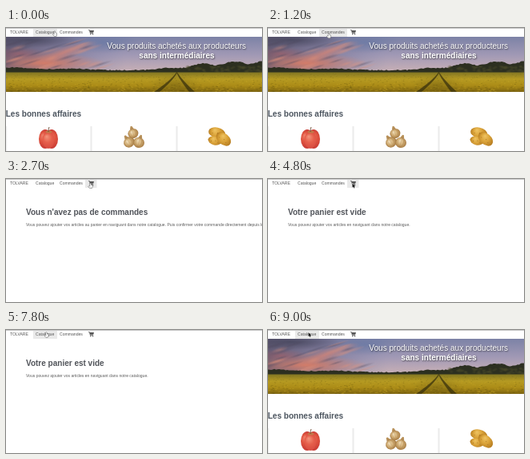
Animation of 320 by 154 pixels, one loop 9200 ms. Source, as an HTML page with a canvas:

```html
<!DOCTYPE html>
<html lang="fr">
<head>
<meta charset="utf-8">
<title>Boutique</title>
<style>
html, body { margin: 0; width: 100%; height: 100%; overflow: hidden; background: #fff; }
canvas { display: block; width: 320px; height: 154px; }
</style>
</head>
<body>
<canvas id="stage"></canvas>
<script>
const W = 320, H = 154, LOOP = 9200, STEP = 100;
const canvas = document.getElementById('stage');
const ctx = canvas.getContext('2d');
const ratio = window.devicePixelRatio || 1;
canvas.width = W * ratio;
canvas.height = H * ratio;
ctx.scale(ratio, ratio);

const FONT = '"Liberation Sans", Arial, sans-serif';

// Pointer path: start, end, from, to
const MOVES = [
  { t0: 0, t1: 600, from: [61, 4], to: [76, 6.5] },
  { t0: 1900, t1: 2700, from: [76, 7], to: [105.5, 5.5] },
  { t0: 5900, t1: 6800, from: [105.5, 5.5], to: [50.5, 3] }
];

const TABS = [
  { x: 34, w: 30 },
  { x: 64, w: 35 },
  { x: 99, w: 14.5 }
];

function random(seed) {
  return () => (seed = (seed * 16807) % 2147483647) / 2147483647;
}

function rect(x, y, w, h, fill) {
  ctx.fillStyle = fill;
  ctx.fillRect(x, y, w, h);
}

function text(str, x, y, size, color, bold) {
  ctx.font = (bold ? 'bold ' : '') + size + 'px ' + FONT;
  ctx.fillStyle = color;
  ctx.fillText(str, x, y);
}

function ellipse(x, y, rx, ry, fill) {
  ctx.fillStyle = fill;
  ctx.beginPath();
  ctx.ellipse(x, y, rx, ry, 0, 0, Math.PI * 2);
  ctx.fill();
}

function polygon(points, fill, stroke, width) {
  ctx.beginPath();
  points.forEach(([x, y]) => ctx.lineTo(x, y));
  ctx.closePath();
  if (stroke) {
    ctx.strokeStyle = stroke;
    ctx.lineWidth = width;
    ctx.stroke();
  }
  ctx.fillStyle = fill;
  ctx.fill();
}

function linear(x0, y0, x1, y1, ...colors) {
  const g = ctx.createLinearGradient(x0, y0, x1, y1);
  colors.forEach((c, i) => g.addColorStop(i / (colors.length - 1), c));
  return g;
}

function ball(x, y, rx, ry, light, mid, dark) {
  const g = ctx.createRadialGradient(x - rx * .3, y - ry * .4, 0, x, y, Math.max(rx, ry));
  g.addColorStop(0, light);
  g.addColorStop(.5, mid);
  g.addColorStop(1, dark);
  ellipse(x, y, rx, ry, g);
}

function glow(x, y, rx, ry, rgb, alpha, angle = 0) {
  ctx.save();
  ctx.translate(x, y);
  ctx.rotate(angle);
  ctx.scale(rx, ry);
  const g = ctx.createRadialGradient(0, 0, 0, 0, 0, 1);
  g.addColorStop(0, `rgba(${rgb},${alpha})`);
  g.addColorStop(1, `rgba(${rgb},0)`);
  rect(-1, -1, 2, 2, g);
  ctx.restore();
}

function sky(rnd) {
  rect(0, 11, W, 48, linear(0, 11, 0, 57, '#7c82a6', '#a199b5', '#cdb3b6'));
  rect(0, 11, W, 48, linear(0, 0, 150, 0, 'rgba(88,80,104,.85)', 'rgba(112,106,138,.55)', 'rgba(120,128,170,0)'));
  glow(122, 18, 45, 14, '104,120,164', .7);
  glow(48, 44, 75, 13, '218,124,100', .9);
  glow(72, 31, 45, 8, '222,132,112', .7, -.3);
  glow(16, 32, 34, 8, '170,98,104', .6);
  glow(30, 15, 60, 10, '66,66,88', .75);
  for (let i = 0; i < 30; i++) {
    const x = rnd() * 120, y = 14 + rnd() * 36;
    glow(x, y, 8 + rnd() * 14, 1.5 + rnd() * 2, i % 2 ? '226,146,122' : '78,72,94', .4, -.3);
  }
}

function trees(rnd) {
  const hump = (x, at, width) => Math.exp(-(((x - at) / width) ** 2));
  ctx.fillStyle = '#2c2f20';
  ctx.beginPath();
  ctx.moveTo(0, 58);
  for (let x = 0; x <= W; x += 2) {
    const height = 2.5 + 3.5 * hump(x, 0, 50) + 2 * hump(x, 85, 25) + 3 * hump(x, 205, 24) +
      8 * hump(x, 245, 17) + 11 * hump(x, 286, 22) + 11 * hump(x, 322, 14);
    ctx.lineTo(x, 56 - height - rnd() * 1.3);
  }
  ctx.lineTo(W, 58);
  ctx.fill();
  for (let i = 0; i < 70; i++) {
    const x = 225 + rnd() * 95;
    glow(x, 48 + rnd() * 7, 3, 2, '76,76,42', .45);
  }
}

function track(bottom, bend, width) {
  ctx.fillStyle = 'rgba(58,50,14,.75)';
  ctx.beginPath();
  ctx.moveTo(213, 55.5);
  ctx.quadraticCurveTo(bend, 65, bottom, 80);
  ctx.lineTo(bottom + width, 80);
  ctx.quadraticCurveTo(bend + width * .4, 65, 214, 55.5);
  ctx.fill();
}

function field(rnd) {
  rect(0, 55.5, W, 25, linear(0, 56, 0, 80, '#857823', '#b59a22', '#ac8c17', '#7d6410'));
  for (let i = 0; i < 650; i++) {
    const depth = rnd();
    rect(rnd() * W, 57 + depth * 23, .8 + depth * 2, .4 + depth * .5,
      i % 2 ? 'rgba(214,180,42,.36)' : 'rgba(78,68,12,.32)');
  }
  glow(212, 72, 32, 13, '82,70,14', .35);
  track(185, 207, 7);
  track(229, 217, 7);
}

function banner() {
  const rnd = random(37);
  ctx.save();
  ctx.beginPath();
  ctx.rect(0, 11, W, 69);
  ctx.clip();
  sky(rnd);
  trees(rnd);
  field(rnd);
  ctx.shadowColor = 'rgba(0,0,0,.6)';
  ctx.shadowBlur = 2 * ratio;
  ctx.shadowOffsetX = ctx.shadowOffsetY = .6 * ratio;
  ctx.textAlign = 'center';
  text('Vous produits achetés aux producteurs', 213.2, 26, 10.05, '#fff');
  text('sans intermédiaires', 213.5, 38, 10.05, '#fff', true);
  ctx.restore();
}

function apple(x, y) {
  for (const side of [-1, 1]) ball(x + side * 4, y, 8, 12, '#f08a74', '#e0533f', '#c63a34');
  ball(x, y + 1, 7.5, 11, '#f3967e', '#e65f4b', '#d64a3f');
  ellipse(x + .5, y - 9, 4, 1.6, '#c07a4a');
  ctx.strokeStyle = '#66452c';
  ctx.lineWidth = .9;
  ctx.beginPath();
  ctx.moveTo(x, y - 9);
  ctx.quadraticCurveTo(x, y - 13, x + 1, y - 15);
  ctx.stroke();
}

function onion(x, y, r, angle) {
  ctx.save();
  ctx.translate(x, y);
  ctx.rotate(angle);
  polygon([[-2.5, 1 - r], [-.8, -r - 3], [1, -r - 3], [2.5, 1 - r]], '#b8915a');
  ball(0, 0, r, r * .92, '#f1dfbb', '#d6b47c', '#a67a41');
  ctx.strokeStyle = 'rgba(140,96,48,.4)';
  ctx.lineWidth = .4;
  for (const k of [-.6, 0, .6]) {
    ctx.beginPath();
    ctx.moveTo(0, -r);
    ctx.quadraticCurveTo(k * r * 1.7, 0, 0, r * .85);
    ctx.stroke();
  }
  ctx.restore();
}

function potato(x, y, rx, ry, angle) {
  ctx.save();
  ctx.translate(x, y);
  ctx.rotate(angle);
  ball(0, 0, rx, ry, '#efc464', '#dba43a', '#b47a20');
  for (const k of [-.5, .1, .5]) ellipse(k * rx, k * k * ry, .6, .4, '#94641c');
  ctx.restore();
}

function homePage() {
  banner();
  text('Les bonnes affaires', -.3, 111, 10.05, '#4c555f', true);
  for (const x of [-1.5, 105, 212]) {
    rect(x, 123, 3, H - 123, linear(x, 0, x + 3, 0, '#f8f8f8', '#ececec', '#f8f8f8'));
  }
  apple(53, 139);
  onion(159, 132, 6.5, -.3);
  onion(154, 143, 7, -.6);
  onion(166, 143.5, 7, .3);
  potato(263.5, 131, 10.5, 6.5, .2);
  potato(261, 141, 8.5, 5.5, .2);
  potato(272, 139, 10.5, 7, .7);
}

function messagePage(title, body) {
  text(title, 25, 45, 10, '#51545a', true);
  text(body, 25, 59, 5.05, '#5c5c5c');
}

function cart() {
  ctx.strokeStyle = '#555';
  ctx.lineWidth = .8;
  ctx.beginPath();
  ctx.moveTo(103, 2.6);
  ctx.lineTo(104.4, 2.6);
  ctx.lineTo(105.4, 6.7);
  ctx.lineTo(109, 6.7);
  ctx.stroke();
  polygon([[104.5, 3], [110, 3], [109.2, 5.8], [105.2, 5.8]], '#555');
  ellipse(105.8, 7.8, .7, .7, '#555');
  ellipse(108.6, 7.8, .7, .7, '#555');
}

function navBar(x) {
  rect(0, 0, W, 11, '#fff');
  const tab = TABS[x < 64.5 ? 0 : x < 99 ? 1 : 2];
  rect(tab.x, 1, tab.w, 10, '#e9e9e9');
  rect(0, 0, W, 1, '#c9c9c9');
  text('TOLVARE', 5, 7.2, 5.1, '#555');
  text('Catalogue', 37, 7.2, 5.1, '#555');
  text('Commandes', 67, 7.2, 5.1, '#555');
  cart();
}

function pointer(x, y, hand) {
  ctx.save();
  ctx.translate(x, y);
  if (hand) {
    polygon([[-.6, 0], [.4, 0], [.6, 2], [2.4, 2.6], [2.6, 4], [1.9, 6],
      [-.9, 6], [-2.4, 3.9], [-1.8, 3.3], [-.7, 4]], '#eee', '#555', .9);
  } else {
    polygon([[0, 0], [0, 5.3], [1.2, 4.2], [2, 6.1], [2.9, 5.7], [2.1, 3.9], [3.7, 3.8]],
      '#111', '#fff', .8);
  }
  ctx.restore();
}

function pointerAt(t) {
  const move = MOVES.filter(m => t >= m.t0).pop();
  const p = Math.min(1, (t - move.t0) / (move.t1 - move.t0));
  const e = p * p * (3 - 2 * p);
  return move.from.map((v, i) => v + (move.to[i] - v) * e);
}

function draw(t) {
  const [x, y] = pointerAt(t);
  rect(0, 0, W, H, '#fff');
  if (t < 1300 || t >= 7900) {
    homePage();
  } else if (t < 4200) {
    messagePage("Vous n'avez pas de commandes",
      'Vous pouvez ajouter vos articles au panier en naviguant dans notre catalogue. ' +
      'Puis confirmer votre commande directement depuis le catalogue.');
  } else {
    messagePage('Votre panier est vide',
      'Vous pouvez ajouter vos articles en naviguant dans notre catalogue.');
  }
  navBar(x);
  // A freshly loaded page shows the arrow until the mouse moves.
  const arrow = (t >= 1300 && t < 2000) || (t >= 4200 && t < 5700) || t >= 7900;
  pointer(x, y, !arrow);
}

const start = performance.now();
let last = -1;
function frame() {
  const t = Math.floor(((performance.now() - start) % LOOP) / STEP) * STEP;
  if (t !== last) draw(last = t);
  requestAnimationFrame(frame);
}
frame();
</script>
</body>
</html>
```
